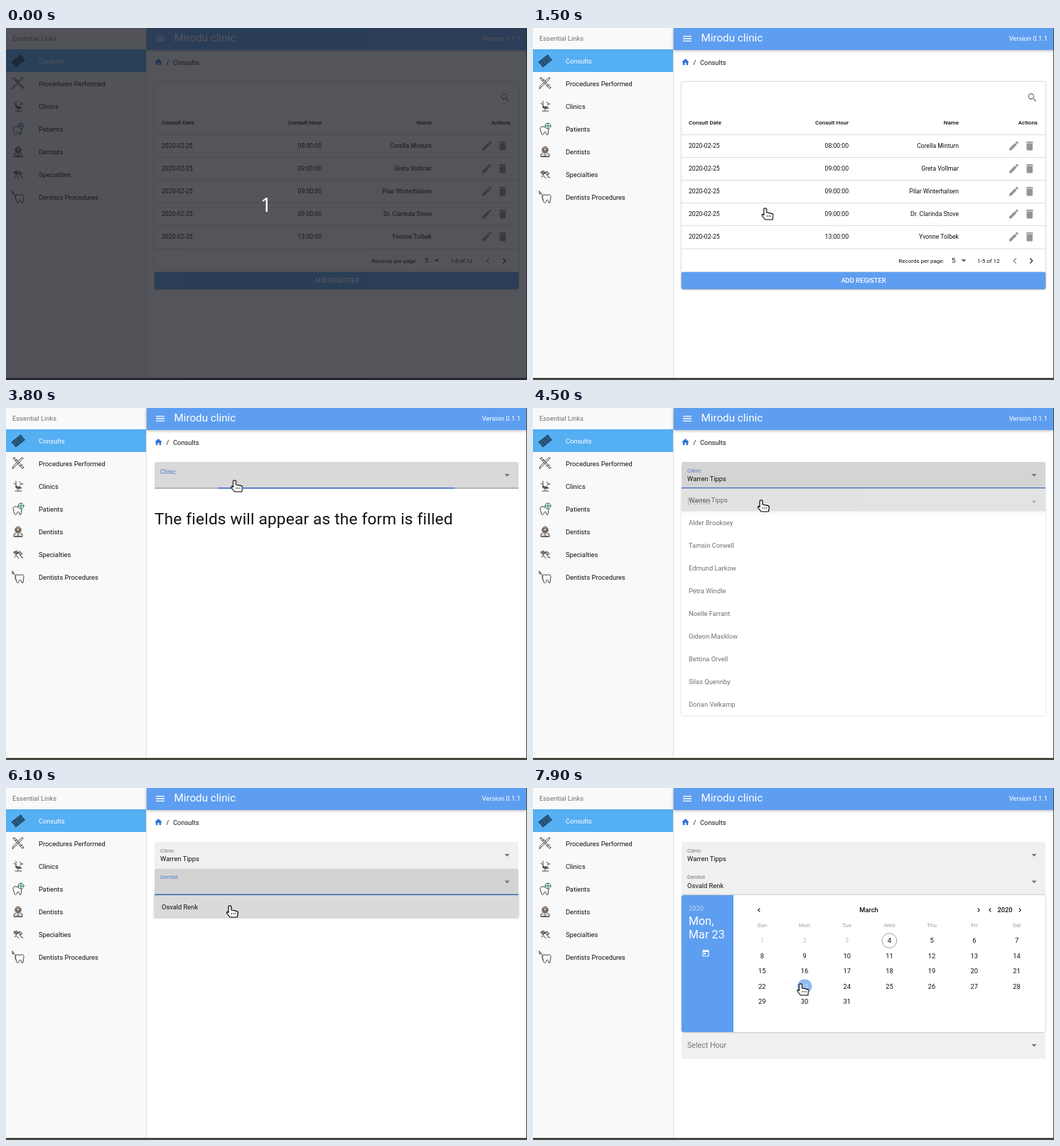
Animation, 733 px wide and 496 px high, one loop 8000 ms. Source, as an HTML page:

```html
<!DOCTYPE html>
<html lang="en">
<head>
<meta charset="utf-8">
<title>Clinic consults</title>
<style>
html, body { margin: 0; width: 100%; height: 100%; overflow: hidden; background: #fff; }
svg { display: block; width: 733px; height: 496px; font-family: Roboto, sans-serif; }
.card { filter: drop-shadow(0 .7px 1.3px rgba(0,0,0,.36)); }
.bar { filter: drop-shadow(0 1px 2px rgba(0,0,0,.3)); }
.line { fill: none; stroke: #333; stroke-width: .9; stroke-linejoin: round; stroke-linecap: round; }
.status { font-family: "Noto Sans", "Open Sans", sans-serif; }

/* One loop is 8 s, so 100 ms is 1.25% */
.a { animation: 8s step-end infinite; }
#veil { animation-name: veil; }
#rowHover { animation-name: rowHover; }
#link1 { animation-name: link1; }
#link2 { animation-name: link2; }
#press { animation-name: press; }
#table { animation-name: table; }
#form { animation-name: form; }
#heading { animation-name: heading; }
#clinic { animation-name: clinic; }
#clinicList { animation-name: clinicList; }
#dentist { animation-name: dentist; }
#dentistList { animation-name: dentistList; }
#calendar { animation-name: calendar; }
#hour { animation-name: picked; }
.picked { animation-name: picked; }
.unpicked { animation-name: unpicked; }
#dot { animation-name: dot; }
#cursor { animation-name: cursor; }
#arrow { animation-name: arrow; }
#hand { animation-name: hand; }

@keyframes veil { 0% { opacity: 1 } 6.25%, 100% { opacity: 0 } }
@keyframes rowHover { 0% { opacity: 0 } 10% { opacity: .08 } 11.25% { opacity: .15 } 18.75%, 100% { opacity: 0 } }
@keyframes link1 { 0% { opacity: 0 } 10% { opacity: 1 } 18.75%, 100% { opacity: 0 } }
@keyframes link2 { 0% { opacity: 0 } 20% { opacity: 1 } 33.75%, 100% { opacity: 0 } }
@keyframes press { 0% { opacity: 0 } 20% { opacity: .15 } 22.5% { opacity: .25 } 23.75%, 100% { opacity: .32 } }
@keyframes table { 0% { opacity: 1 } 25% { opacity: .4 } 26.25%, 100% { opacity: 0 } }
@keyframes form { 0% { opacity: 0 } 26.25% { opacity: .5 } 27.5%, 100% { opacity: 1 } }
@keyframes heading { 0% { opacity: 1 } 56.25%, 100% { opacity: 0 } }
@keyframes clinicList { 0% { opacity: 0 } 48.75% { opacity: .3 } 50% { opacity: .8 } 51.25% { opacity: 1 } 56.25% { opacity: .6 } 57.5% { opacity: .2 } 58.75%, 100% { opacity: 0 } }
@keyframes dentistList { 0% { opacity: 0 } 71.25% { opacity: .4 } 72.5% { opacity: .85 } 73.75% { opacity: 1 } 80% { opacity: .5 } 81.25%, 100% { opacity: 0 } }
@keyframes calendar { 0% { opacity: 0 } 81.25% { opacity: .6 } 82.5%, 100% { opacity: 1 } }
@keyframes picked { 0% { opacity: 0 } 96.25%, 100% { opacity: 1 } }
@keyframes unpicked { 0% { opacity: 1 } 96.25%, 100% { opacity: 0 } }
@keyframes dot { 0% { opacity: 0 } 92.5% { opacity: .3 } 95% { opacity: .6 } 96.25%, 100% { opacity: 1 } }

/* p: label float, f: focus line, b: bottom border, v: value, c: label colour */
.field { --bg: #f0f0f0; --p: 0; --f: 0; --b: 0; --v: 0; --c: #757575; }
.field .bg { fill: var(--bg); }
.field .rim { fill: #858585; opacity: var(--b); }
.field .focus { fill: #3f74cf; transform: scaleX(var(--f)); transform-origin: 465px 0; }
.field .label { fill: var(--c); transform: translateY(calc(var(--p) * -7.4px)) scale(calc(1 - .25 * var(--p))); transform-origin: 217px 22px; }
.field .value { opacity: var(--v); }
@keyframes clinic {
  0% { --bg: #f0f0f0; --p: 0; --f: 0; --b: 0; --v: 0; --c: #757575 }
  42.5% { --bg: #e4e4e4; --b: 1 }
  45% { --bg: #dedede; --c: #4a7cc4 }
  46.25% { --p: .07; --f: .07 }
  47.5% { --bg: #d9d9d9; --p: .65; --f: .65 }
  48.75% { --bg: #d4d4d4; --p: .93; --f: .93 }
  50% { --p: 1; --f: 1 }
  55% { --v: 1 }
  67.5% { --f: .945; --c: #757575 }
  68.75% { --f: .35; --bg: #e4e4e4 }
  70% { --f: .06 }
  71.25%, 100% { --f: 0; --bg: #f0f0f0; --b: 0 }
  0%, 100% { --c: #757575 }
}
@keyframes dentist {
  0% { opacity: 0; --bg: #f0f0f0; --p: 0; --f: 0; --b: 0; --v: 0; --c: #757575 }
  56.25% { opacity: 1 }
  62.5% { --bg: #e8e8e8; --b: .6 }
  63.75% { --bg: #e2e3e5; --b: 1 }
  67.5% { --f: .11; --c: #4a7fd0 }
  68.75% { --bg: #dadada; --p: .72; --f: .72 }
  70% { --bg: #d3d3d3; --p: .95; --f: .95 }
  71.25% { --p: 1; --f: 1 }
  78.75% { --v: 1 }
  82.5% { --bg: #e4e4e4; --f: .6; --c: #757575 }
  83.75% { --f: .1 }
  85%, 100% { opacity: 1; --bg: #f0f0f0; --f: 0; --b: 0 }
}
@keyframes cursor {
  0% { opacity: 0; transform: translate(120px, 180px) }
  8.75% { opacity: 1; transform: translate(120px, 180px); animation-timing-function: steps(4, start) }
  13.75% { opacity: 1; transform: translate(186px, 44px) }
  17.5% { opacity: 1; transform: translate(186px, 44px); animation-timing-function: steps(3, start) }
  21.25% { opacity: 1; transform: translate(397px, 359px) }
  32.5% { opacity: 1; transform: translate(397px, 359px); animation-timing-function: steps(9, start) }
  43.75% { opacity: 1; transform: translate(321.5px, 102px) }
  51.25% { opacity: 1; transform: translate(321.5px, 102px); animation-timing-function: steps(2, start) }
  53.75% { opacity: 1; transform: translate(321px, 130px) }
  57.5% { opacity: 1; transform: translate(321px, 130px); animation-timing-function: steps(3, start) }
  61.25% { opacity: 1; transform: translate(321px, 137px) }
  71.25% { opacity: 1; transform: translate(321px, 137px); animation-timing-function: steps(4, start) }
  76.25% { opacity: 1; transform: translate(315px, 166px) }
  87.5% { opacity: 1; transform: translate(315px, 166px); animation-timing-function: steps(6, start) }
  95%, 100% { opacity: 1; transform: translate(376.5px, 276px) }
}
@keyframes arrow { 0% { opacity: 0 } 28.75% { opacity: 1 } 42.5%, 100% { opacity: 0 } }
@keyframes hand { 0% { opacity: 1 } 28.75% { opacity: 0 } 42.5%, 100% { opacity: 1 } }
</style>
</head>
<body>
<script>
const BLUE = '#5e9ef0', INK = '#111';
const range = n => [...Array(n).keys()];

const text = (x, y, s, { size = 9.33, fill = INK, at = 'start', extra = '' } = {}) =>
  `<text x="${x}" y="${y}" font-size="${size}" fill="${fill}" text-anchor="${at}" ${extra}>${s}</text>`;
const rect = (x, y, w, h, fill, extra = '') =>
  `<rect x="${x}" y="${y}" width="${w}" height="${h}" fill="${fill}" ${extra}/>`;
const group = (id, body, cls = '') => `<g id="${id}" class="a ${cls}">${body}</g>`;

const shapes = {
  menu: 'M3 18h18v-2H3zm0-5h18v-2H3zm0-7v2h18V6z',
  home: 'M10 20v-6h4v6h5v-8h3L12 3 2 12h3v8z',
  search: 'M15.5 14h-.8l-.3-.3A6.5 6.5 0 1 0 13.7 14.4l.3.3v.8l5 5 1.5-1.5zm-6 0a4.5 4.5 0 1 1 0-9 4.5 4.5 0 0 1 0 9z',
  edit: 'M3 17.25V21h3.75L17.8 9.94l-3.75-3.75zM20.7 7.04a1 1 0 0 0 0-1.41l-2.34-2.34a1 1 0 0 0-1.41 0l-1.83 1.83 3.75 3.75z',
  trash: 'M6 19a2 2 0 0 0 2 2h8a2 2 0 0 0 2-2V7H6zM19 4h-3.5l-1-1h-5l-1 1H5v2h14z',
  caret: 'M7 10l5 5 5-5z',
  left: 'M15.4 7.4 14 6l-6 6 6 6 1.4-1.4-4.6-4.6z',
  right: 'M10 6 8.6 7.4l4.6 4.6-4.6 4.6L10 18l6-6z',
  today: 'M19 3h-1V1h-2v2H8V1H6v2H5a2 2 0 0 0-2 2v14a2 2 0 0 0 2 2h14a2 2 0 0 0 2-2V5a2 2 0 0 0-2-2zm0 16H5V8h14zM7 10h5v5H7z'
};
const icon = (name, cx, cy, size, fill) =>
  `<path d="${shapes[name]}" fill="${fill}" fill-rule="evenodd" transform="translate(${cx - size / 2} ${cy - size / 2}) scale(${size / 24})"/>`;

// Sidebar
const tooth = 'M2 7q0-4 4-3 2 1 4 0 4-1 4 3l-1 8q-2 2-2.5-2-1.500-4-3 0-1 4-3 2z';
const sketches = [
  '<path transform="rotate(-38 8 8)" fill="#2d5f87" stroke="#173247" d="M0 4h16v3q-2 1 0 3v3H0v-3q2-2 0-3zM4 4v9M7 7h6M7 10h5"/>',
  '<path d="M1 1l13 14M3 0l13 14M15 1 3 13l-3 3 1-4L13 0zM1 1l2-1M14 15l2-1M4 4l3-1M10 12l4-2"/>',
  '<path d="M5 1v6l3 3h4M4 8l4 3h5M8 11v3M4 15h9M10 2l3 3-2 2M12 5h3M2 4l3 2"/><path d="M5 9h6v2H6z" fill="#777"/>',
  `<path transform="translate(-1 1)" d="${tooth}"/><circle cx="12" cy="4" r="4" fill="#d7f3ec" stroke="#376f6b"/><path d="M8 4h8M12 0v8" stroke="#376f6b"/>`,
  '<path d="M4 8V4q4-6 8 0v4M2 15v-3l4-3h4l4 3v3z" fill="#ddd"/><circle cx="8" cy="6" r="3" fill="#d9b9a0"/><path d="M5 7h6M8 10v4M4 15h8"/>',
  '<path d="M2 5l4-2 2 3-3 3zM8 6l5 6M10 4l4 3-2 2zM3 12l3-2 3 4M12 12l3 1"/><path d="M3 5l3 3 3-2z" fill="#888"/>',
  `<path transform="translate(2 1)" d="${tooth}"/><path d="M0 0l5 7M0 0v4l2-1M4 8l1 4"/>`
];
const links = ['Consults', 'Procedures Performed', 'Clinics', 'Patients', 'Dentists', 'Specialties', 'Dentists Procedures'];
const sidebar = rect(0, 0, 197, 493, '#f9f9f9') + rect(197, 0, 1, 493, '#dedede') +
  text(9, 18, 'Essential Links', { fill: '#717171' }) +
  rect(0, 30, 197, 32, '#55aff3') + rect(0, 30, 197, 32, '#fff', 'id="rowHover" class="a"') +
  links.map((s, i) =>
    `<g class="line" transform="translate(9 ${38 + 32 * i})">${sketches[i]}</g>` +
    text(46, 50 + 32 * i, s, { fill: i ? INK : '#fff' })).join('');

const header = rect(198, 0, 535, 31, BLUE, 'class="bar"') + icon('menu', 217, 15, 16, '#fff') +
  text(236.500, 19, 'Mirodu clinic', { size: 15.2, fill: '#fff' }) +
  text(724, 18, 'Version 0.1.1', { fill: '#fff', at: 'end' }) +
  icon('home', 214.5, 48, 12.7, '#3374d4') + text(225.5, 52, '/') + text(235, 52, 'Consults');

// Consults table
const records = [['08', 'Corella Minturn'], ['09', 'Greta Vollmar'], ['09', 'Pilar Winterhalsen'],
  ['09', 'Dr. Clarinda Stove'], ['13', 'Yvonne Tolbek']];
const head = (x, s, at = 'end') => text(x, 136, s, { size: 8, at, extra: 'font-weight="500"' });
const record = ([h, name], i) => {
  const y = 166 + 32 * i, end = { size: 8.67, at: 'end' };
  return rect(209, y - 16, 512, 1, '#dcdcdc') + text(219, y + 3, '2020-02-25', { size: 8.67 }) +
    text(444, y + 3, h + ':00:00', end) + text(599, y + 3, name, end) +
    icon('edit', 676.5, y, 17, '#949494') + icon('trash', 698.7, y, 17, '#949494');
};
const table = rect(209, 76, 512, 292, '#fff', 'rx="3" class="card"') + icon('search', 702.500, 98, 16, '#757575') +
  head(219, 'Consult Date', 'start') + head(444, 'Consult Hour') + head(599, 'Name') + head(710, 'Actions') +
  records.map(record).join('') + rect(209, 310.5, 512, 1, '#dcdcdc') +
  text(578.5, 330.5, 'Records per page:', { size: 8, at: 'end' }) + text(589, 331, '5') +
  icon('caret', 606, 327.5, 17, '#666') + text(625, 330.5, '1-5 of 12', { size: 8 }) +
  icon('left', 678, 328, 16, '#8a8a8a') + icon('right', 701, 328, 16, '#333') +
  rect(209, 344, 512, 24, BLUE, 'rx="2" class="card"') + rect(209, 344, 512, 24, '#fff', 'id="press" class="a" rx="2"') +
  text(465, 359.3, 'ADD REGISTER', { fill: '#fff', at: 'middle', extra: 'font-weight="500"' });

// Form
const field = (id, y, label, value = '') => `<g transform="translate(0 ${y})">` + group(id,
  '<path class="bg" d="M209 37.500V3q0-3 3-3h506q3 0 3 3v34.500z"/>' +
  '<rect class="rim" x="209" y="36.500" width="512" height="1"/><rect class="focus" x="209" y="36" width="512" height="1.500"/>' +
  text(217, 22, label, { size: 10.67, fill: '', extra: 'class="label"' }).replace('fill=""', '') +
  text(217, 27, value, { extra: 'class="value"' }) + icon('caret', 705, 18.5, 17, '#757575'), 'field') + '</g>';

const list = (id, y, names) => group(id, rect(208.5, y, 512.5, 32 * names.length, '#fff', 'class="card"') +
  rect(208.5, y, 512.5, 32, '#dadada') + names.map((s, i) => text(219, y + 19.5 + 32 * i, s)).join(''));

const clinics = ['Warren Tipps', 'Alder Brooksey', 'Tamsin Corwell', 'Edmund Larkow', 'Petra Windle',
  'Noelle Farrant', 'Gideon Masklow', 'Bettina Orvell', 'Silas Quennby', 'Dorian Velkamp'];

const day = n => {
  const cell = n - 1, x = 322.3 + 59.7 * (cell % 7), y = 215 + 21.5 * Math.floor(cell / 7);
  const ring = n === 4 ? `<circle cx="${x}" cy="${y}" r="10.3" fill="none" stroke="#777" stroke-width=".7"/>` : '';
  const dot = n === 23 ? `<circle id="dot" class="a" cx="${x + .2}" cy="${y}" r="10.3" fill="#8fbdf3"/>` : '';
  const label = (fill, extra) => text(x, y + 3.3, n, { fill, at: 'middle', extra });
  return ring + dot + (n === 23
    ? label(INK, 'class="a unpicked"') + label('#c6ddf9', 'class="a picked"')
    : label(n < 4 ? '#c2c2c2' : INK));
};
const title = (x, s) => text(x, 175.3, s, { at: 'middle', extra: 'font-weight="500"' });
const big = (y, s, cls) => text(219, y, s, { size: 16, fill: '#fff', extra: `class="a ${cls}" letter-spacing=".12"` });
const calendar = rect(209, 151, 512, 193, '#fff', 'rx="3" class="card"') +
  `<path d="M282 151v193h-70q-3 0-3-3V154q0-3 3-3z" fill="${BLUE}"/>` +
  text(219, 173, '2020', { fill: '#c3dbfa', extra: 'class="a picked"' }) +
  text(219, 173, '---', { fill: '#c3dbfa', extra: 'class="a unpicked"' }) +
  big(193, 'Mon,', 'picked') + big(212, 'Mar 23', 'picked') + big(193, '---', 'unpicked') +
  icon('today', 243, 233, 12, '#fff') + title(472.5, 'March') + title(664, '2020') +
  icon('left', 318, 172, 12, INK) + icon('right', 627, 172, 12, INK) +
  icon('left', 643, 172, 12, INK) + icon('right', 685, 172, 12, INK) +
  ['Sun', 'Mon', 'Tue', 'Wed', 'Thu', 'Fri', 'Sat'].map((s, i) =>
    text(322.3 + 59.7 * i, 196.3, s, { size: 8, fill: '#9b9b9b', at: 'middle' })).join('') +
  range(31).map(i => day(i + 1)).join('');

const form = text(209, 164, 'The fields will appear as the form is filled',
    { size: 22.67, extra: 'id="heading" class="a" letter-spacing=".167"' }) +
  field('clinic', 76, 'Clinic', clinics[0]) + field('dentist', 113.5, 'Dentist', 'Osvald Renk') +
  field('hour', 344, 'Select Hour') + group('calendar', calendar) +
  list('clinicList', 113.5, clinics) + list('dentistList', 151, ['Osvald Renk']);

// Link preview and pointer
const preview = (id, w, path) => group(id,
  `<path d="M-1 470.500H${w - 3}q3 0 3 3V494H-1z" fill="#f1f1ef" stroke="#cfcfcc"/>` +
  text(3, 487, 'localhost:8081/' + path, { size: 14.7, fill: '#646464', extra: 'class="status"' }));

const pointer = '<g stroke="#000" fill="#fff" stroke-width="1.2" stroke-linejoin="round">' +
  '<path id="arrow" class="a" d="M0 0V16L3.700 12.600 6.500 18.800 9 17.700 6.200 11.700H11z"/>' +
  '<g id="hand" class="a"><path d="M-2 1.500C-2-.6 2-.6 2 1.500V6L9 7.300q2.500.5 2.300 3L10.300 16H0L-4 11q-1.200-2.200.5-2.700L-2 9.600z"/>' +
  '<path d="M2.500 10v2M5 10v2M7.500 10v2" stroke-width=".8"/></g></g>';

document.body.innerHTML = '<svg viewBox="0 0 733 496">' + rect(0, 0, 733, 496, '#fff') + sidebar + header +
  group('table', table) + group('form', form) +
  preview('link1', 170, 'consults') + preview('link2', 221.5, 'consults/create') +
  rect(732, 0, 1, 496, '#45483e') + rect(0, 493, 733, 3, '#45483e') +
  group('cursor', pointer) +
  group('veil', rect(0, 0, 733, 496, 'rgba(26,29,37,.75)') +
    text(366, 259, '1', { size: 28, fill: '#fff', at: 'middle', extra: 'class="status"' })) + '</svg>';
</script>
</body>
</html>
```
